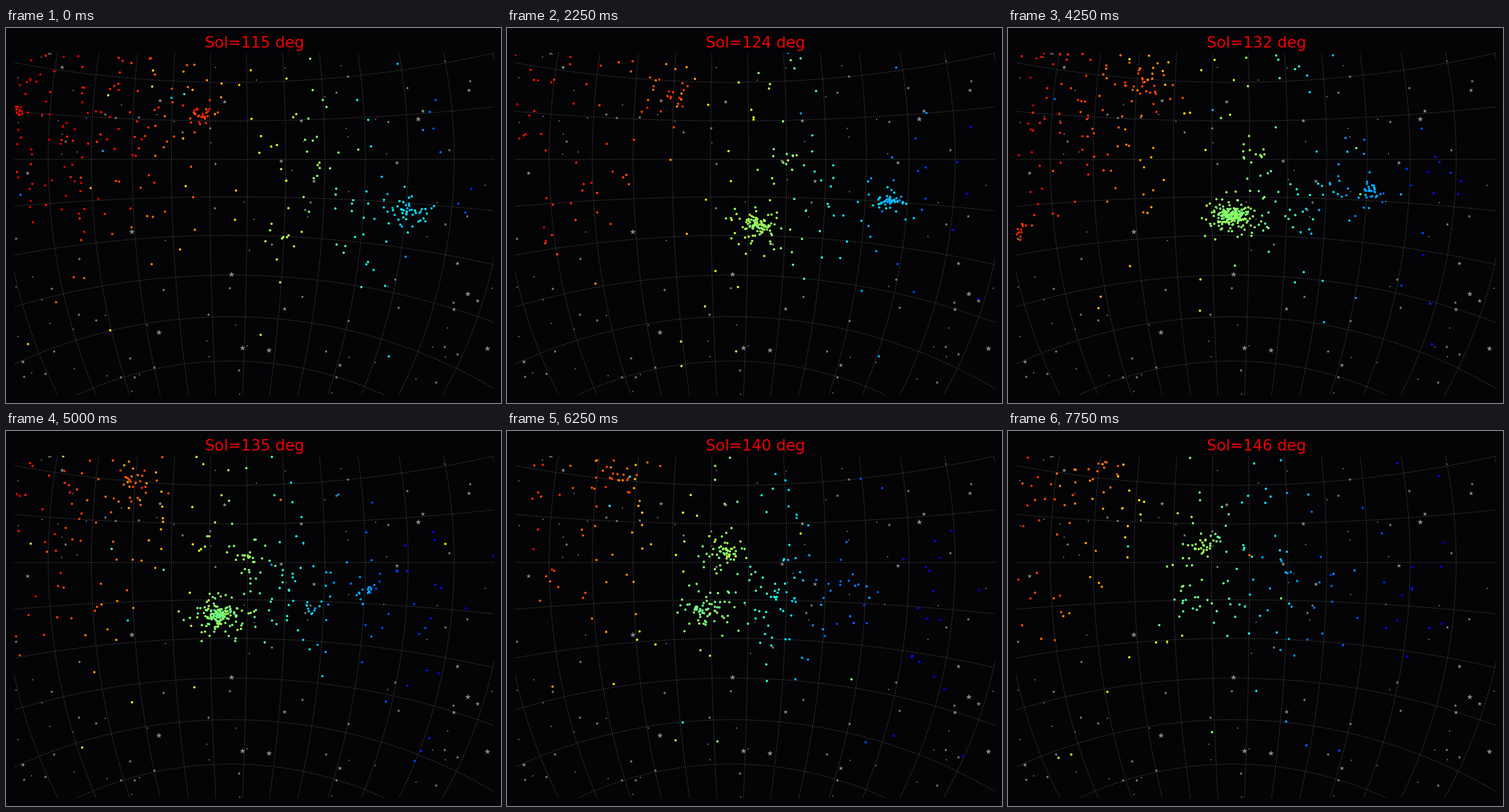
A matplotlib script for the animation above (8 s loop, 859 by 652 pixels).

```python
import numpy as np
import matplotlib.pyplot as plt
from matplotlib.animation import FuncAnimation

W, H, DPI = 859, 652, 100
LEFT, RIGHT, TOP, BOTTOM = 14, 846.5, 43, 638
FRAMES, INTERVAL, FIRST_SOL = 32, 250, 115
BG, GRID, STAR = "#040306", "#4a4d48", "#8a8a8a"

# Stereographic sky: centre in pixels, radius of the sphere, first meridian
CX, CY, R, LON0 = 389.8, 227.5, 377, 4.45

# The most conspicuous stars; the faint ones are scattered by seed
BRIGHT = [(390, 427), (714, 157), (217, 353), (409, 555), (455, 559),
          (834, 556), (800, 461), (264, 528)]
MEDIUM = [(96, 67), (266, 125), (378, 127), (511, 160), (722, 143),
          (802, 107), (782, 408), (817, 473), (776, 488), (36, 251),
          (578, 585), (28, 579), (482, 487), (533, 265), (476, 230),
          (677, 233)]

# Showers: start, drift per step, spread, (peak, step of peak, width, base),
# colour value at start and end
SOUTH = (487, 360), (-5.8, -2)
NORTH = (548, 240), (-6.7, -1.2)
EAST = (697, 317), (-3.9, -2)
SLOW = (336, 150), (-5.5, -3)
EDGE = (122, 372), (-6.2, -1.5)
CORNER = (21, 147), (-6, 0)
SHOWERS = [
    (*SOUTH, (12, 6), (110, 15, 7, 3), (.56, .46)),
    (*SOUTH, (26, 19), (85, 17, 10, 0), (.57, .49)),
    (*NORTH, (9, 7), (18, 27, 7, 4), (.53, .53)),
    (*NORTH, (24, 20), (30, 26, 5, 5), (.53, .52)),
    (*EAST, (9, 6), (32, 10, 10, 0), (.34, .25)),
    (*EAST, (27, 18), (30, 0, 9, 4), (.35, .25)),
    (*SLOW, (14, 11), (18, 0, 4, 8), (.86, .80)),
    (*SLOW, (28, 24), (16, 20, 10, 4), (.86, .80)),
    (*EDGE, (9, 12), (12, 16, 7, 0), (.88, .84)),
    (*CORNER, (5, 4), (9, 0, 2, 0), (.90, .90)),
]


def project(lon, lat):
    lon, lat = np.radians(lon), np.radians(lat)
    k = 2 * R / (1 + np.cos(lat) * np.cos(lon))
    return CX + k * np.cos(lat) * np.sin(lon), CY - k * np.sin(lat)


def activity(step, peak, at, width, base=0):
    return round(base + peak * np.exp(-((step - at) / width) ** 2))


def sky_hue(x, y, step):
    """Red in the west to blue in the east, drifting with the sun."""
    u = x + 6.6 * step
    u = u + np.maximum(y - 300, 0) * np.maximum((500 - u) / 300, 0)
    return .5 - .45 * np.tanh((u - 545) / 290)


def sporadics(rng, step):
    n = activity(step, 85, 0, 5, 40) + activity(step, 45, 17, 4)
    red = np.column_stack([rng.uniform(LEFT, 345 - 3.5 * step, n),
                           TOP + 330 * rng.beta(1, 1.4, n)])
    n = activity(step, 38, 24, 9, 28)
    apex = rng.normal((590 - 4.8 * step, 325 - 1.8 * step), (60, 52), (n, 2))
    n = activity(step, 14, 23, 7, 8)
    blue = rng.normal((745 - 2 * step, 290), (65, 90), (n, 2))
    wide = np.column_stack([rng.uniform(LEFT, RIGHT - 90, 30),
                            TOP + 420 * rng.beta(1, 1.6, 30)])
    high = rng.uniform((340 - 2 * step, TOP), (560 - 2 * step, 220), (16, 2))
    low = rng.uniform((LEFT, 390), (RIGHT, 590), (9, 2))
    return np.vstack([red, apex, blue, wide, high, low])


def meteors(step):
    rng = np.random.default_rng(700 + step)
    spots = sporadics(rng, step)
    hues = sky_hue(*spots.T, step) + rng.normal(0, .02, len(spots))
    odd = rng.random(len(hues)) < .03
    hues[odd] = rng.uniform(.2, .8, odd.sum())
    parts, values = [spots], [hues]
    for start, drift, spread, rate, (v0, v1) in SHOWERS:
        n = activity(step, *rate)
        centre = np.add(start, np.multiply(drift, step))
        parts.append(rng.normal(centre, spread, (n, 2)))
        hue = v0 + (v1 - v0) * step / (FRAMES - 1)
        values.append(rng.normal(hue, .022, n))
    return np.vstack(parts), np.clip(np.concatenate(values), .05, .94)


def area(px):
    return (px * 72 / DPI) ** 2


def add_stars(points, px):
    x, y = np.add(points, .5).T
    ax.scatter(x, y, s=area(px), marker="*", color=STAR,
               linewidths=0, zorder=2)


fig = plt.figure(figsize=(W / DPI, H / DPI), dpi=DPI, facecolor=BG)
ax = fig.add_axes([LEFT / W, 1 - BOTTOM / H,
                   (RIGHT - LEFT) / W, (BOTTOM - TOP) / H])
ax.set_xlim(LEFT, RIGHT)
ax.set_ylim(BOTTOM, TOP)
ax.axis("off")

span = np.linspace(-75, 75, 301)
line = dict(color=GRID, lw=1, ls=":", zorder=1)
for lat in range(-50, 21, 10):
    ax.plot(*project(span, np.full_like(span, lat)), **line)
for i in range(-6, 7):
    ax.plot(*project(np.full_like(span, LON0 + 10 * i), span), **line)

add_stars(BRIGHT, 10.5)
add_stars(MEDIUM, 8)
sky = np.random.default_rng(12)
for amount, px in ((45, 6), (65, 3.6)):
    add_stars(sky.uniform((LEFT, TOP), (RIGHT, BOTTOM), (amount, 2)), px)

# Small arc cut off by the upper edge
bend = np.linspace(0, np.pi, 12)
ax.plot(76 + 2.2 * np.cos(bend), 46 - 2 * np.sin(bend),
        color="#b0b0b0", lw=.8, zorder=2)

dots = ax.scatter([], [], s=area(4.1), c=[], cmap="jet", vmin=0, vmax=1,
                  linewidths=0, zorder=3)
title = fig.text(431 / W, 1 - 34 / H, "", color="#f00000", ha="center",
                 va="baseline", family="DejaVu Sans", fontsize=19.2)


def draw(step):
    spots, hues = meteors(step)
    dots.set_offsets(spots)
    dots.set_array(hues)
    title.set_text(f"Sol={FIRST_SOL + step} deg")
    return dots, title


anim = FuncAnimation(fig, draw, frames=FRAMES, interval=INTERVAL,
                     repeat=True, repeat_delay=0)
plt.show()
```
